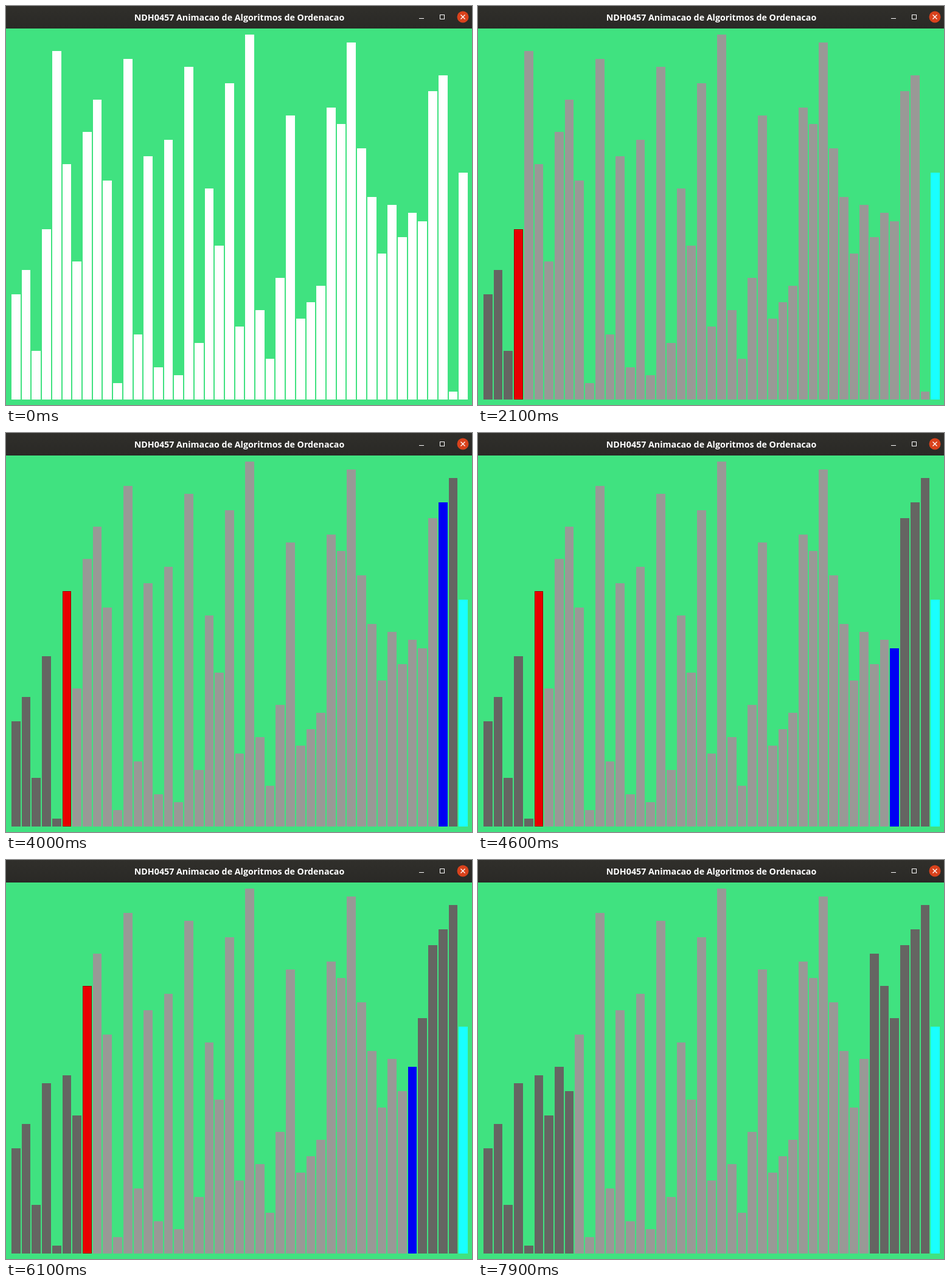
An HTML page with a canvas for the animation above (8 s loop, 766 px wide and 656 px high).

```html
<!DOCTYPE html>
<html lang="pt">
<head>
<meta charset="utf-8">
<title>Ordenacao</title>
<style>
  html, body { margin: 0; width: 100%; height: 100%; overflow: hidden; background: #40e280; }
  canvas, svg { position: absolute; left: 0; top: 0; display: block; }
  text { font: bold 14.25px "Open Sans", "Noto Sans", sans-serif; fill: #fff; text-anchor: middle; }
</style>
</head>
<body>
<canvas id="stage" width="766" height="656"></canvas>
<svg width="766" height="37" viewBox="0 0 766 37">
  <defs>
    <linearGradient id="bar" x2="0" y2="1">
      <stop offset="0" stop-color="#302f2b"/>
      <stop offset="1" stop-color="#2a2926"/>
    </linearGradient>
  </defs>
  <rect width="766" height="37" fill="url(#bar)"/>
  <text x="383.5" y="24">NDH0457 Animacao de Algoritmos de Ordenacao</text>
  <g fill="none" stroke="#fff">
    <path d="M679 20.5h8"/>
    <rect x="713.5" y="14.5" width="7" height="7"/>
    <circle cx="751" cy="18" r="9.5" fill="#d9421c" stroke="none"/>
    <path d="M747.5 14.5l7 7m0-7l-7 7" stroke-width="1.3"/>
  </g>
</svg>
<script>
const ctx = document.getElementById('stage').getContext('2d');
const LOOP = 8000, BASE = 647, UNIT = 40 / 3, PITCH = 16.71, LEFT = 9.02, WIDTH = 14.7;
const COLORS = {
  back: '#40e280', idle: '#fff', open: '#999996', done: '#656562',
  pivot: '#19ffff', low: '#e80000', lowEdge: '#9c0000', high: '#0000f4'
};
const VALUES = [
  13, 16, 6, 21, 43, 29, 17, 33, 37, 27, 2, 42, 8, 30, 4,
  32, 3, 41, 7, 26, 19, 39, 9, 45, 11, 5, 15, 35, 10, 12,
  14, 36, 34, 44, 31, 25, 18, 24, 20, 23, 22, 38, 40, 1, 28
];
const PIVOT = VALUES.length - 1;

// Partition steps: lo scans right, hi scans left, then the two trade places.
const ACTIONS = {
  begin: s => { s.running = true; },
  low: s => { s.showLow = true; },
  next: s => { s.lo++; },
  high: s => { s.showHigh = true; s.hi--; },
  prev: s => { s.hi--; },
  both: s => { s.lo++; ACTIONS.high(s); },
  swap: s => { [s.v[s.lo], s.v[s.hi]] = [s.v[s.hi], s.v[s.lo]]; },
  settle: s => { s.lo++; s.showLow = s.showHigh = false; }
};
const STEPS = [
  [900, 'begin'], [1400, 'low'], [1500, 'next'], [1800, 'next'], [2100, 'next'],
  [2700, 'both'], [3000, 'swap'], [3400, 'settle'],
  [3700, 'low'], [4000, 'high'], [4300, 'prev'], [4600, 'prev'], [4900, 'swap'], [5200, 'settle'],
  [5700, 'low'], [5900, 'next'], [6100, 'high'], [6400, 'swap'], [6700, 'settle'],
  [7000, 'low'], [7300, 'high'], [7600, 'swap'], [7900, 'settle']
];

function stateAt(time) {
  const s = { v: VALUES.slice(), lo: 0, hi: PIVOT, running: false, showLow: false, showHigh: false };
  for (const [at, name] of STEPS) {
    if (at > time) break;
    ACTIONS[name](s);
  }
  return s;
}

function colorOf(i, s) {
  if (!s.running) return COLORS.idle;
  if (i === PIVOT) return COLORS.pivot;
  if (s.showLow && i === s.lo) return COLORS.low;
  if (s.showHigh && i === s.hi) return COLORS.high;
  return i < s.lo || i >= s.hi ? COLORS.done : COLORS.open;
}

function drawBar(i, value, color) {
  const x = Math.round(LEFT + PITCH * i);
  const w = Math.round(LEFT + PITCH * i + WIDTH) - x;
  const y = Math.round(BASE - UNIT * value);
  ctx.fillStyle = color;
  ctx.fillRect(x, y, w, BASE - y);
  if (color === COLORS.low) {
    ctx.strokeStyle = COLORS.lowEdge;
    ctx.strokeRect(x + 0.5, y + 0.5, w - 1, BASE - y - 1);
  }
}

function draw(time) {
  const s = stateAt(time);
  ctx.fillStyle = COLORS.back;
  ctx.fillRect(0, 0, 766, 656);
  s.v.forEach((value, i) => drawBar(i, value, colorOf(i, s)));
}

const start = performance.now();
function tick() {
  draw((performance.now() - start) % LOOP);
  requestAnimationFrame(tick);
}
tick();
</script>
</body>
</html>
```
